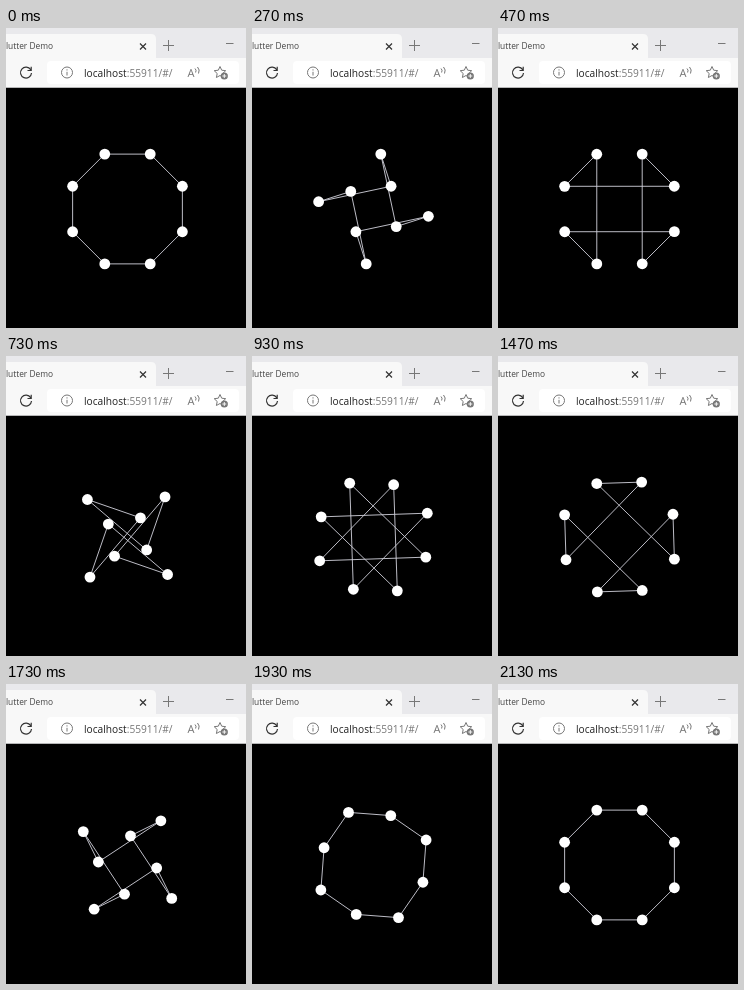
An HTML page for the animation above (2.19 s loop, 240x300 px).

```html
<!DOCTYPE html>
<html>
<head>
<meta charset="utf-8">
<style>
html, body { margin: 0; width: 100%; height: 100%; overflow: hidden; background: #000; }
svg { display: block; width: 240px; height: 300px; }
text { font-family: "Open Sans", "Noto Sans", sans-serif; }
.icon { fill: none; stroke: #777; stroke-width: 1; }
.dark { stroke: #333; stroke-width: 1.2; }
</style>
</head>
<body>
<svg viewBox="0 0 240 300">
  <defs>
    <marker id="dot" markerUnits="userSpaceOnUse" markerWidth="12" markerHeight="12" refX="6" refY="6">
      <circle cx="6" cy="6" r="5.4" fill="#fff"/>
    </marker>
  </defs>

  <!-- browser bar -->
  <rect width="240" height="59.5" fill="#e9e9ec"/>
  <path d="M0 6H145Q150 6 150 11V30H240V59.500H0Z" fill="#f8f8f8"/>
  <rect x="41" y="33" width="192" height="23" rx="4" fill="#fff"/>
  <text x="0" y="21" font-size="8.4" fill="#444">lutter Demo</text>
  <text x="78" y="48.5" font-size="10.2" fill="#777"><tspan fill="#222">localhost</tspan>:55911/#/</text>
  <path class="icon dark" d="M134 15.500l6 6m0-6l-6 6"/>
  <path class="icon" d="M157 17.500h11m-5.500-5.500v11M220 15.500h7.500"/>
  <path class="icon dark" d="M24.700 41.700A5.500 5.500 0 1 0 25.500 45M25.200 38.800v3.700h-3.700"/>
  <g class="icon">
    <circle cx="61" cy="44.500" r="5.500"/>
    <path d="M61 43.800v3.700M61 41.300v1.200"/>
    <path d="M189 40.500q1.800 1.600 0.600 4M191.500 39q2.800 2.800 1 6.500"/>
  </g>
  <text x="181.500" y="49" font-size="11" fill="#777">A</text>
  <path class="icon" d="M214 38.500l1.700 3.700 4 .5-3 2.800.8 4-3.500-2-3.600 2 .8-4-3-2.800 4.100-.5z"/>
  <circle cx="218.300" cy="48" r="3.600" fill="#777"/>
  <path d="M216.300 48h4m-2-2v4" stroke="#fff" stroke-width=".9"/>

  <polygon id="web" fill="none" stroke="#d2d2dc" stroke-width=".9"
    marker-start="url(#dot)" marker-mid="url(#dot)"/>
</svg>
<script>
const LOOP = 2190, FIRST = 119, PERIOD = 515, MOVE = 362;
const web = document.getElementById('web');

const corner = v => {
  const a = (v * 45 - 112.5) * Math.PI / 180;
  return [121.5 + 59.4 * Math.cos(a), 181 + 59.4 * Math.sin(a)];
};

// In turn, every other corner's dot moves one corner on, the rest three.
const hop = (v, phase) => v + ((v + phase) % 2 ? 3 : 1);

function dotAt(i, phase, k) {
  let v = i;
  for (let p = 0; p < phase; p++) v = hop(v, p);
  const from = corner(v), to = corner(hop(v, phase));
  return from.map((c, j) => (c + (to[j] - c) * k).toFixed(2));
}

function draw(now) {
  // 15 pictures per second, on times rounded to 10 ms
  const tick = Math.floor((now % LOOP + 4) * 3 / 200);
  const t = Math.min(Math.round(tick * 20 / 3) * 10, 2130) - FIRST;
  const phase = Math.min(3, Math.max(0, Math.floor(t / PERIOD)));
  const x = Math.min(1, Math.max(0, (t - phase * PERIOD) / MOVE));
  const eased = 1 - (1 - x) ** 2;
  web.setAttribute('points', [...Array(8).keys()].map(i => dotAt(i, phase, eased)).join(' '));
  requestAnimationFrame(draw);
}
draw(0);
</script>
</body>
</html>
```
